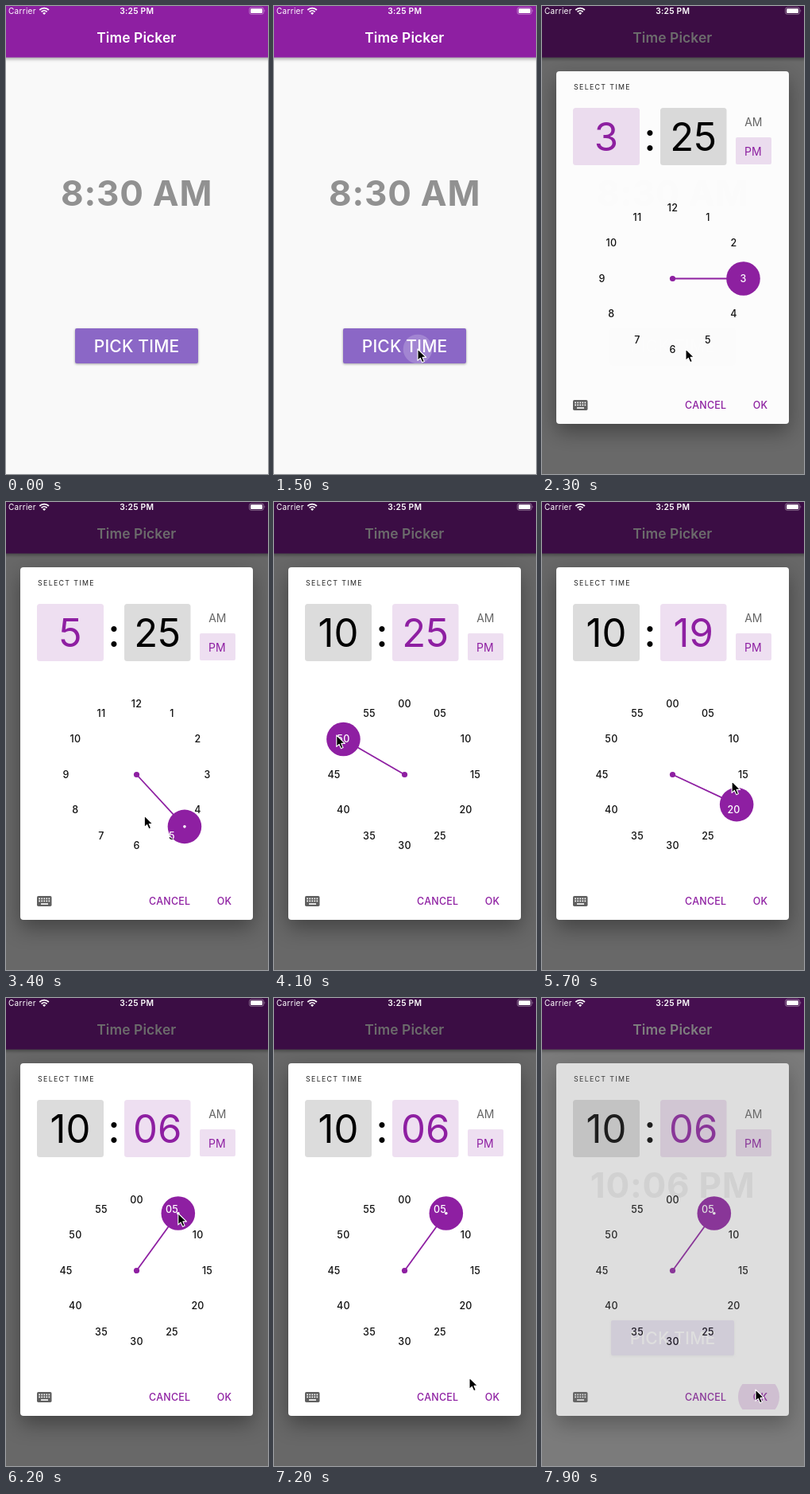
Recreate the animation shown at these times as an HTML page. Size 330 by 588 pixels, loop 8 s.

```html
<!DOCTYPE html>
<html lang="en">
<head>
<meta charset="utf-8">
<title>Time Picker</title>
<style>
  html, body { margin: 0; width: 100%; height: 100%; overflow: hidden; background: #f9f9f9; }
  svg { display: block; width: 330px; height: 588px; font-family: Inter, Roboto, sans-serif; }
  text { text-anchor: middle; white-space: pre; }
  .purple { fill: #8e1fa2; }
  .tint { fill: #eedff1; }
  .grey { fill: #dcdcdc; }
  .big { font-size: 49px; }
  .label { font-size: 12.5px; font-weight: 550; letter-spacing: .25px; }
  .action { font-size: 12.4px; font-weight: 550; letter-spacing: .3px; }
  .bar { filter: drop-shadow(0 2px 2px rgba(0,0,0,.35)); }
  .btn { filter: drop-shadow(0 1.5px 1.5px rgba(0,0,0,.35)); }
  .sheet { filter: drop-shadow(0 10px 13px rgba(0,0,0,.36)); }
</style>
</head>
<body>
<svg viewBox="0 0 330 588">
  <defs>
    <clipPath id="discClip"><circle id="hole" r="21.3"/></clipPath>
    <clipPath id="btnClip"><rect x="87" y="405" width="155" height="44" rx="2"/></clipPath>
    <clipPath id="okClip"><rect x="244" y="485" width="58" height="32" rx="3"/></clipPath>
  </defs>

  <rect width="330" height="588" fill="#f9f9f9"/>
  <rect class="bar purple" x="-6" y="-6" width="342" height="70.6"/>
  <text x="164.3" y="46" font-size="17.4" font-weight="560" letter-spacing=".1" fill="#fff">Time Picker</text>
  <text id="chosen" x="164.7" y="251.3" font-size="44" font-weight="700" letter-spacing=".8" fill="#919191"></text>
  <rect class="btn" x="87" y="405" width="155" height="44" rx="2" fill="#8b67c6"/>
  <circle id="btnRipple" cx="181" cy="431" fill="#fff" fill-opacity=".2" clip-path="url(#btnClip)"/>
  <text x="164.6" y="434.5" font-size="21" font-weight="530" letter-spacing=".2" fill="#fff">PICK TIME</text>

  <rect id="barrier" width="330" height="588" fill="#000"/>

  <g fill="#fff">
    <text x="3" y="10" font-size="10" style="text-anchor:start" letter-spacing=".3">Carrier</text>
    <path d="M42.3 5a8.2 8.2 0 0 1 11.6 0M44.6 7.3a5 5 0 0 1 7 0" fill="none" stroke="#fff" stroke-width="1.8"/>
    <path d="M48.1 11l-2-2.1a2.9 2.9 0 0 1 4 0z"/>
    <text x="164.7" y="10" font-size="10.3" font-weight="600" letter-spacing=".25">3:25 PM</text>
    <rect x="306.5" y="1.9" width="18" height="8.4" rx="2.4" fill="none" stroke="#fff" stroke-opacity=".5" stroke-width=".8"/>
    <rect x="308" y="3.3" width="15" height="5.6" rx="1.2"/>
    <path d="M325.6 4.6q1.4 1.5 0 3z" fill-opacity=".6"/>
  </g>

  <g id="dialog">
    <rect class="sheet" x="18" y="82" width="293" height="443" rx="4" fill="#fff"/>
    <text x="40" y="105.3" font-size="8.8" letter-spacing="1.35" style="text-anchor:start" fill="#222">SELECT TIME</text>
    <rect id="hourBox" x="39" y="128" width="84" height="72" rx="3.5"/>
    <rect id="minBox" x="149" y="128" width="83.5" height="72" rx="3.5"/>
    <text id="hour" class="big" x="81" y="182"></text>
    <text class="big" x="136" y="182" font-weight="500">:</text>
    <text id="minute" class="big" x="190.7" y="182"></text>
    <text x="266.3" y="151.3" font-size="14" fill="#666">AM</text>
    <rect class="tint" x="244" y="165" width="45" height="34" rx="2"/>
    <text class="purple" x="265.8" y="187.5" font-size="14">PM</text>

    <g id="labels" fill="#111"></g>
    <circle class="purple" cx="164.5" cy="342.5" r="3.6"/>
    <line id="hand" x1="164.5" y1="342.5" stroke="#8e1fa2" stroke-width="1.8"/>
    <circle id="disc" class="purple" r="21.3"/>
    <circle id="dot" r="1.8" fill="#fff"/>
    <g id="inverse" fill="#fff" clip-path="url(#discClip)"></g>

    <rect x="39" y="495" width="18.5" height="13" rx="1.8" fill="#606060"/>
    <path d="M41.3 498.4h14.2M41.3 501.4h14.2" stroke="#fff" stroke-width="1.6" stroke-dasharray="1.7 1.35"/>
    <path d="M44 505h9" stroke="#fff" stroke-width="1.6"/>
    <text class="action purple" x="206.2" y="505.6">CANCEL</text>
    <circle id="okRipple" class="purple" cx="273" cy="501" fill-opacity=".18" clip-path="url(#okClip)"/>
    <text class="action purple" x="275" y="505.6">OK</text>
  </g>

  <path id="cursor" d="M0 0V14.4L3.3 11.4L5.7 16.7L8.3 15.6L6 10.4H10.6Z" fill="#000" stroke="#fff" stroke-width="1.1" stroke-linejoin="round"/>
</svg>

<script>
const LOOP = 8000, STEP = 100;
const CX = 164.5, CY = 342.5, R = 89;
const OPEN = 2000, MINUTES = 4100, CONFIRM = 7800;
const LAG = 130; // the hand trails the pointer

const $ = id => document.getElementById(id);
const set = (id, attrs) => {
  for (const k in attrs) $(id).setAttribute(k, attrs[k]);
};
const pad = n => String(n).padStart(2, '0');
const mix = (a, b, p) => a + (b - a) * p;
const ramp = (t, from, to) => Math.min(1, Math.max(0, (t - from) / (to - from)));
const smooth = p => p * p * (3 - 2 * p);
const easeOut = (p, n) => 1 - (1 - p) ** n;

function polar(deg, r) {
  const a = deg * Math.PI / 180;
  return [CX + r * Math.sin(a), CY - r * Math.cos(a)];
}

// Drags round the dial: angles in degrees, reach = final radius, dip = cut towards the centre
const hourDrag = { from: 3000, to: 3900, a: 90, b: 300, reach: 99, dip: 44 };
const minuteDrag = { from: 5200, to: 6150, a: 150, b: 36, reach: 89, dip: 16 };

const dragAngle = (d, t) => mix(d.a, d.b, ramp(t, d.from, d.to) ** 1.84);

function dragPoint(d, t) {
  const p = ramp(t + LAG, d.from, d.to);
  return polar(dragAngle(d, t + LAG), mix(R, d.reach, p) - d.dip * Math.sin(Math.PI * p));
}

const glide = (from, to, a, b) => ({
  from,
  at(t) {
    const p = smooth(ramp(t, from, to));
    return [mix(a[0], b[0], p), mix(a[1], b[1], p)];
  }
});
const drag = d => ({ from: d.from - LAG, at: t => dragPoint(d, t) });

const button = [181, 431], nearOk = [246, 477], ok = [269, 492];
const legs = [
  glide(400, 1300, [342, 478], button),
  glide(2300, 2850, button, polar(90, R)),
  drag(hourDrag),
  glide(4600, 5050, dragPoint(hourDrag, 4600), polar(150, R)),
  drag(minuteDrag),
  glide(6400, 7200, dragPoint(minuteDrag, 6400), nearOk),
  glide(7200, 7500, nearOk, ok)
];

function handAngle(t) {
  if (t < MINUTES) return dragAngle(hourDrag, t);
  if (t < minuteDrag.from) return mix(hourDrag.b, minuteDrag.a, smooth(ramp(t, MINUTES, 4500)));
  return dragAngle(minuteDrag, t);
}

function dialLabels(minutes) {
  let out = '';
  for (let i = 0; i < 12; i++) {
    const [x, y] = polar(i * 30, R);
    out += `<text class="label" x="${x}" y="${y + 4.2}">${minutes ? pad(i * 5) : i || 12}</text>`;
  }
  return out;
}
const dials = [dialLabels(false), dialLabels(true)];
let shown = -1;

function showDial(mode) {
  if (mode === shown) return;
  shown = mode;
  $('labels').innerHTML = $('inverse').innerHTML = dials[mode];
  set('hourBox', { class: mode ? 'grey' : 'tint' });
  set('minBox', { class: mode ? 'tint' : 'grey' });
  set('hour', { class: mode ? 'big' : 'big purple' });
  set('minute', { class: mode ? 'big purple' : 'big' });
}

function render(t) {
  showDial(t < MINUTES ? 0 : 1);

  const deg = handAngle(t);
  $('hour').textContent = Math.round(dragAngle(hourDrag, t) / 30);
  $('minute').textContent = pad(Math.round(dragAngle(minuteDrag, t) / 6));
  $('chosen').textContent = t < CONFIRM ? '8:30 AM' : '10:06 PM';

  const [x, y] = polar(deg, R);
  set('hand', { x2: x, y2: y });
  for (const id of ['disc', 'hole', 'dot']) set(id, { cx: x, cy: y });
  // The dot shows only when the hand rests between two labels.
  const gap = (450 - deg) % 30;
  set('dot', { opacity: gap > 5.7 && gap < 25.8 ? 1 : 0 });

  const open = ramp(t, OPEN, OPEN + 350) - ramp(t, CONFIRM, CONFIRM + 200);
  set('dialog', { opacity: easeOut(open, 2) });
  set('barrier', { opacity: .58 * easeOut(open, 3) });
  set('btnRipple', { r: t < MINUTES ? 110 * ramp(t, 1400, OPEN) : 0 });
  set('okRipple', { r: 26 * easeOut(ramp(t, 7500, CONFIRM), 2) });

  const leg = legs.filter(l => l.from <= t).pop() || legs[0];
  set('cursor', { transform: `translate(${leg.at(t)})` });
}

const start = performance.now();
function tick(now) {
  const t = Math.max(0, now - start) % LOOP;
  render(Math.floor(t / STEP) * STEP);
  requestAnimationFrame(tick);
}
render(0);
requestAnimationFrame(tick);
</script>
</body>
</html>
```
